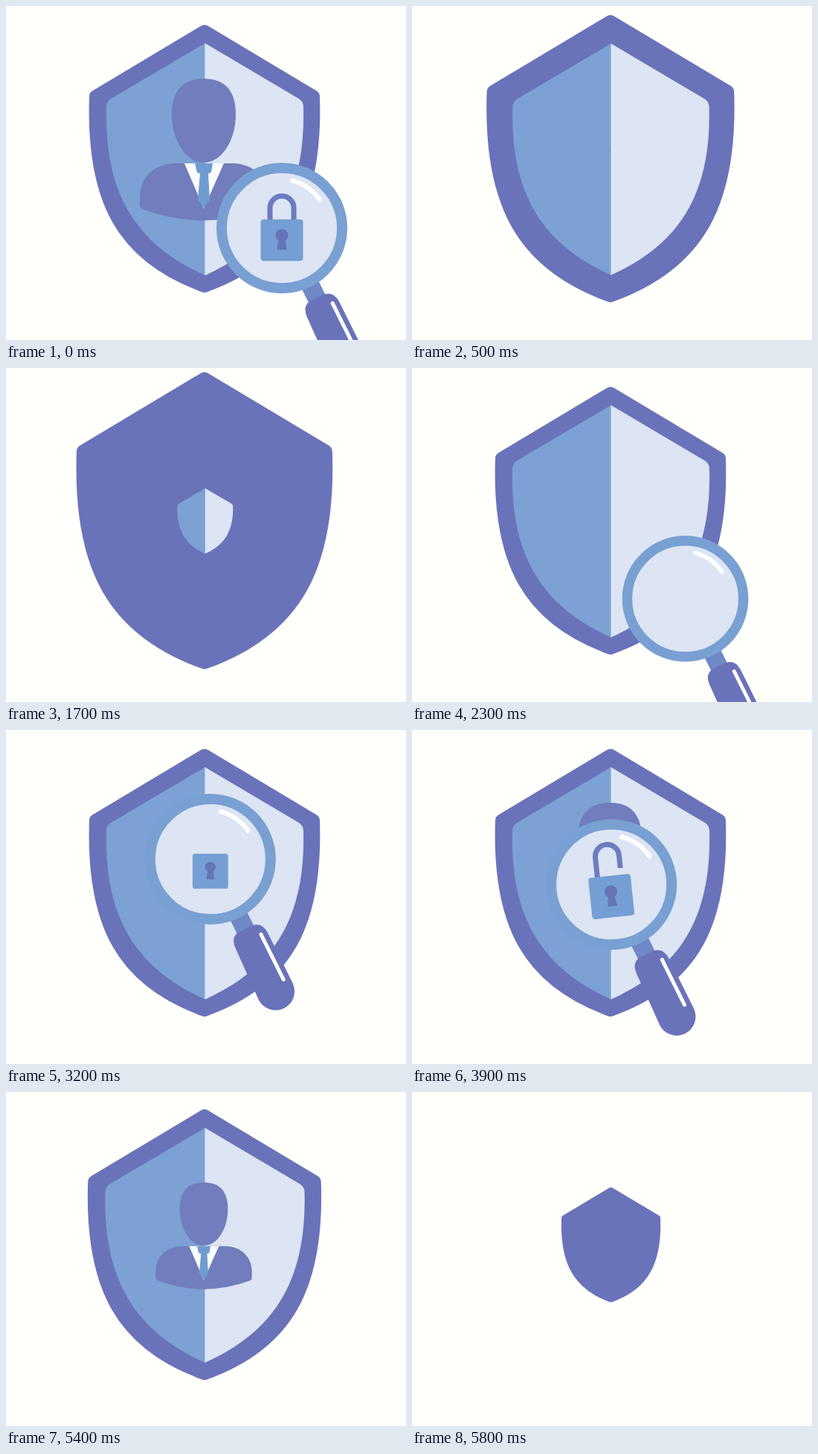
Recreate the animation shown at these times as an HTML page. Size 538 by 450 pixels, loop 5900 ms.

```html
<!DOCTYPE html>
<html lang="en">
<head>
<meta charset="utf-8">
<title>Shield and magnifier</title>
<style>
html, body { margin: 0; width: 100%; height: 100%; overflow: hidden; background: #fffffc; }
svg { display: block; width: 538px; height: 450px; }
</style>
</head>
<body>
<svg viewBox="0 0 538 450">
  <g id="shield">
    <path d="M267 34.5L413 122C418 262 376 338 267 377C158 338 116 262 121 122Z"
      fill="#6a73ba" stroke="#6a73ba" stroke-width="18" stroke-linejoin="round"/>
    <g id="inner">
      <path d="M268 50L141 125Q135 129 135 136C132 252 174 321 268 363Z" fill="#7ba1d5"/>
      <path d="M267.5 50L394 125Q400 129 400 136C403 252 361 321 267.5 363Z" fill="#dde4f3"/>
    </g>
    <g id="person" fill="#717dbc">
      <path id="head" d="M266 98C296 98 309 116 309 146C309 181 290 211 266 211C242 211 223 181 223 146C223 116 236 98 266 98Z"/>
      <g id="torso">
        <path d="M225 212C195 214 180 235 180 258V268Q180 272 184 274Q225 289 266 289Q307 289 348 274Q352 272 352 268V258C352 235 337 214 307 212Z"/>
        <path d="M240 212H293L266 273Z" fill="#fbfcfd"/>
        <path d="M254 212H278L276 224L272 226L274 261L266 272L258 261L261 226L257 224Z" fill="#6f9cd0"/>
      </g>
    </g>
  </g>
  <g id="glass">
    <g transform="rotate(-26.4)">
      <path d="M-12.5 82H12.5V112H-12.5Z" fill="#6f88c6"/>
      <path d="M-9 105H9Q25 106 25 124V198.5A25.5 25.5 0 0 1 -26 198.5L-23 122Q-22 106 -9 105Z" fill="#6a72ba"/>
      <path d="M16 121V189" stroke="#fff" stroke-width="5" stroke-linecap="round"/>
    </g>
    <circle r="81" fill="#dde4f3" stroke="#78a0d3" stroke-width="14"/>
    <path d="M14 -64A65 65 0 0 1 51 -38" fill="none" stroke="#fff" stroke-width="6" stroke-linecap="round"/>
    <g id="lock">
      <path id="shackle" d="M-16 -8V-43.5A16 16 0 0 1 16 -43.5V-26" fill="none" stroke="#6d7cc0" stroke-width="7"/>
      <rect x="-28.5" y="-28" width="57" height="56" rx="4" fill="#759fd4"/>
      <path d="M-3.5 0A7.5 7.5 0 1 1 3.5 0L5.5 12H-5.5Z" fill="#6774b8" stroke="#6774b8" stroke-width="2" stroke-linejoin="round"/>
    </g>
  </g>
</svg>
<script>
const LOOP = 5900, REPEAT = 5040, PEAK = 1.115;
const $ = id => document.getElementById(id);
const place = (id, value) => $(id).setAttribute('transform', value);
const show = (id, on) => $(id).setAttribute('visibility', on ? 'inherit' : 'hidden');
const grow = (id, x, y, s) => {
  place(id, `translate(${x} ${y}) scale(${s}) translate(${-x} ${-y})`);
  $(id).style.display = s > 0.002 ? '' : 'none';
};

function draw(now) {
  const clock = now % LOOP;
  // The loop opens on the closing part of the story
  const t = clock < 900 ? clock + REPEAT : clock;
  const part = (a, b) => Math.min(1, Math.max(0, (t - a) / (b - a)));
  const sine = (a, b) => (1 - Math.cos(Math.PI * part(a, b))) / 2;
  const speedUp = (a, b, p) => part(a, b) ** p;
  const slowDown = (a, b, p) => 1 - (1 - part(a, b)) ** p;

  // Shield overshoots on the way in and again before it shrinks away
  const swell = 1 - sine(1720, 1980) + speedUp(5310, 5600, 2);
  const size = slowDown(1450, 1720, 2) * (1 - speedUp(5600, 5878, 1.5));
  grow('shield', 268, 206, size * (1 + (PEAK - 1) * swell));
  grow('inner', 268, 206, sine(1600, 1900) - sine(5500, 5740));
  grow('person', 266, 195, 1 - sine(5320, 5560));

  // Magnifier uncovers the head, then the torso, and leaves
  const rise = sine(2080, 2400), go = sine(2400, 3300);
  const drop = sine(3600, 4220), leave = sine(4320, 5270);
  const x = 366 + 2 * rise - 96 * go - 8 * drop + 124 * leave;
  const y = 325 - 18 * rise - 137 * go + 80 * drop + 57 * leave;
  const zoom = slowDown(2080, 2380, 2.5) - speedUp(5050, 5190, 2);
  place('glass', `translate(${x} ${y}) scale(${zoom})`);
  show('glass', zoom > 0.002);
  show('head', t > 3350);
  show('torso', t > 4250);

  const pop = slowDown(3060, 3260, 1.5);
  const tilt = -6 * sine(3500, 3800) + 11 * sine(4300, 4800) - 5 * sine(4900, 5030);
  const lift = 40 * (1 - sine(3230, 3450)) - 11 * (sine(3600, 3800) - sine(4300, 4500));
  place('lock', `translate(0 16.3) rotate(${tilt}) scale(${pop})`);
  show('lock', pop > 0);
  place('shackle', `translate(0 ${lift})`);
  show('shackle', t > 3230);
}

const start = performance.now();
function frame() {
  draw(performance.now() - start);
  requestAnimationFrame(frame);
}
frame();
</script>
</body>
</html>
```
